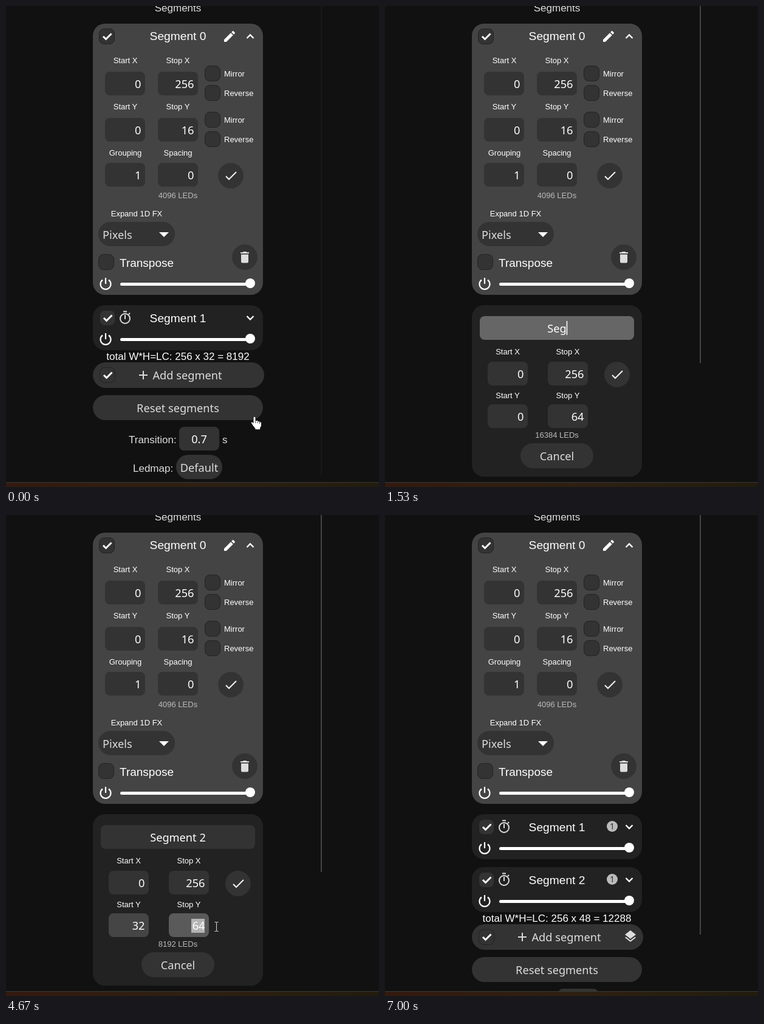
An HTML page that plays this animation: 614 px wide and 791 px high, repeating every 7400 ms.

```html
<!DOCTYPE html>
<html lang="en">
<head>
<meta charset="utf-8">
<title>Adding a segment</title>
<style>
html, body { margin: 0; width: 100%; height: 100%; overflow: hidden; background: #111; }
svg { display: block; width: 614px; height: 791px; }
text { font-family: "Liberation Sans", Arial, sans-serif; fill: #fff; white-space: pre; }
.ui { font-family: "Noto Sans", Tahoma, sans-serif; }
.line { fill: none; stroke: #fff; }
</style>
</head>
<body>
<svg id="stage" viewBox="0 0 614 791"></svg>
<script>
const LOOP = 7400, FORM_AT = 470, LIST_AT = 6130;
const stage = document.getElementById('stage');

// Markup helpers
const box = (x, y, w, h, r, fill, more = '') =>
  `<rect x="${x}" y="${y}" width="${w}" height="${h}" rx="${r}" fill="${fill}" ${more}/>`;
const disc = (x, y, r, fill, more = '') => `<circle cx="${x}" cy="${y}" r="${r}" fill="${fill}" ${more}/>`;
const line = (d, w = 2, color = '#fff') => `<path class="line" d="${d}" style="stroke:${color}" stroke-width="${w}"/>`;
const text = (s, x, y, size, anchor = 'middle', more = '') =>
  `<text x="${x}" y="${y}" font-size="${size}" text-anchor="${anchor}" ${more}>${s}</text>`;
const ui = (s, x, y, anchor = 'middle', color = '#fff', more = '') =>
  text(s, x, y, 18.2, anchor, `class="ui" style="fill:${color}" ${more}`);
const label = (s, x, y, anchor) => text(s, x, y, 13, anchor);
const group = (id, body, dy = 0) => `<g id="${id}" transform="translate(0 ${dy})">${body}</g>`;

const field = (s, x, y, id) =>
  box(x, y, 66, 39, 8, '#333', id ? `id="${id}Box"` : '') +
  (id ? box(x + 37, y + 9, 22, 23, 0, '#b4b4b4', `id="${id}Sel"`) : '') +
  ui(s, x + 59.5, y + 27, 'end', '#fff', id ? `id="${id}"` : '');
const tick = (x, y, on) => box(x - 12.5, y - 12.5, 25, 25, 8, '#333', 'stroke="#222"') +
  (on ? line(`M${x - 6} ${y}l4.5 4.5 9-9`, 3) : '');
const confirm = (x, y, id = 'apply') => disc(x, y, 21, '#333', `id="${id}"`) +
  line(`M${x - 8} ${y + 1}l5 5 12-12`, 2.1, '#eee');
const slider = y =>
  line(`M159 ${y - 6.5}a8.5 8.5 0 1 0 10 0M164 ${y - 10}v10`, 2.2) +
  box(188, y - 2, 218, 5, 2.5, '#fff') + disc(402, y - 1, 8, '#fff');

const openCard = () =>
  box(143, 29, 280, 446, 20, '#444') + tick(166, 50, true) +
  text('Segment 0', 283, 56, 19.2) +
  `<path fill="#fff" transform="translate(356 38)" d="M3 17.25V21h3.75L17.81 9.94l-3.75-3.75zM20.71 7.04a1 1 0 0 0 0-1.41l-2.34-2.34a1 1 0 0 0-1.41 0l-1.83 1.83 3.75 3.75z"/>` +
  line('M396.5 53l5.5-5.5 5.5 5.5', 2.3) +
  [['Start X', 'Stop X', 0, 256, 94, 108], ['Start Y', 'Stop Y', 0, 16, 170, 184],
   ['Grouping', 'Spacing', 1, 0, 246, 258]].map(([a, b, m, n, y, fy]) =>
    label(a, 196.5, y) + label(b, 283, y) + field(m, 163, fy) + field(n, 250, fy)).join('') +
  [111, 187].map(y => tick(340, y) + label('Mirror', 359, y + 5, 'start') +
    tick(340, y + 32) + label('Reverse', 359, y + 37, 'start')).join('') +
  confirm(370, 279) +
  text('4096 LEDs', 283, 316, 13, 'middle', 'style="fill:#bbb"') +
  label('Expand 1D FX', 215, 346) +
  box(152, 355, 126, 40, 20, '#333') + ui('Pixels', 159, 383, 'start', '#ddd') +
  '<path fill="#fff" d="M252 372h16l-8 8z"/>' +
  tick(165, 421) + text('Transpose', 187, 429, 19, 'start') +
  disc(393, 413, 21, '#333') +
  '<path fill="#ddd" d="M386 405h3.5l1-1h5l1 1h3.500v2h-14zM387 408.500h12v12q0 2-2 2h-8q-2 0-2-2z"/>' +
  slider(457);

const card = (n, y, badge) =>
  box(143, y, 280, 74, 20, '#222') + tick(167, y + 21, true) +
  line(`M193 ${y + 10.500}h6M196 ${y + 16}v7M202 ${y + 15}l2-2`, 2, '#ddd') +
  disc(196, y + 22, 8, 'none', 'stroke="#ddd" stroke-width="2"') +
  text('Segment ' + n, 283, y + 28, 19.2) +
  (badge ? disc(374, y + 20, 9, '#bbb') +
    text('1', 374, y + 25, 14, 'middle', 'class="ui" style="fill:#333"') : '') +
  line(`M396.500 ${y + 18}l5.500 5.500 5.500-5.500`, 2.3) + slider(y + 56);

const footer = (total, id, layers) =>
  text(`total W*H=LC: ${total}`, 283, 582, 17) +
  box(143, 586, 282, 42, 21, '#333', `id="${id}"`) + tick(167, 607, true) +
  line('M219 607h14M226 600v14', 2, '#ddd') + ui('Add segment', 241.500, 614, 'start', '#ddd') +
  (layers ? '<path fill="#ddd" transform="translate(392 594)" d="M11.99 18.54l-7.37-5.73L3 14.07l9 7 9-7-1.63-1.27zM12 16l7.36-5.73L21 9l-9-7-9 7 1.63 1.27z"/>' : '') +
  box(143, 640, 280, 41, 20.500, '#333') + ui('Reset segments', 283, 668, 'middle', '#ddd') +
  text('Transition:', 202, 719, 17, 'start', 'style="fill:#ddd"') + box(285, 692, 66, 39, 8, '#333') +
  ui('0.7', 318, 719) + text('s', 356, 719, 17, 'start', 'style="fill:#ddd"') +
  text('Ledmap:', 209, 766, 17, 'start', 'style="fill:#ddd"') + box(280, 738, 76, 40, 20, '#333') +
  ui('Default', 318, 766, 'middle', '#ddd');

const form = () =>
  box(143, 492, 280, 282, 20, '#222') + box(156, 510, 254, 39, 8, '#333', 'id="nameBox"') +
  ui('', 283, 537, 'middle', '#fff', 'id="name"') + box(0, 518, 1.500, 23, 0, '#fff', 'id="caret"') +
  label('Start X', 202, 573) + label('Stop X', 301, 573) + field(0, 169, 585) + field(256, 268, 585) +
  label('Start Y', 202, 645) + label('Stop Y', 301, 645) +
  field(0, 169, 655, 'from') + field(64, 268, 655, 'to') +
  confirm(382, 606, 'create') +
  text('', 283, 710, 13, 'middle', 'id="leds" style="fill:#bbb"') +
  box(223, 719, 120, 41, 20.500, '#333') + ui('Cancel', 283, 747, 'middle', '#ddd');

stage.innerHTML =
  '<linearGradient id="edge"><stop stop-color="#33190f"/><stop offset=".5" stop-color="#2e2012"/><stop offset="1" stop-color="#221c0e"/></linearGradient>' +
  box(0, 0, 614, 791, 0, '#111') +
  text('Segments', 283, 9, 17, 'middle', 'style="fill:#ddd"') +
  box(518, 0, 2, 587, 0, '#444', 'id="bar"') + openCard() +
  group('before', card(1, 492) + footer('256 x 32 = 8192', 'addA')) +
  group('form', form()) +
  group('after', card(1, 492, true) + card(2, 579, true) +
    group('rest', footer('256 x 48 = 12288', 'addB', true), 87)) +
  box(0, 783, 614, 8, 0, 'url(#edge)') + box(0, 783, 614, 1, 0, '#3b3835') +
  '<g id="hand"><path fill="#fff" stroke="#111" d="M-2 2a2 2 0 0 1 4 0v5l1-.6 2 .2 1 1 2 .2 1 1 1.500 .2 1 1.300v5l-2 4v2.500H1v-2l-4-5-2.500-4c-.5-1.500 1.500-2.500 3-1l.5.8z"/>' +
  '<path class="line" style="stroke:#111" stroke-width=".8" d="M2 7v4M5.500 8v3M8.500 9v3"/></g>' +
  '<path id="arrow" fill="#fff" stroke="#111" d="M0 0v16l3.700-3.500 2.300 5.500 2.500-1-2.300-5.300h5z"/>' +
  '<path id="beam" class="line" style="mix-blend-mode:difference" d="M-3-7.500h2.500l.5.500.5-.5H3M0-7V7M-3 7.500h2.500L0 7l.5.500H3"/>';

const el = {};
stage.querySelectorAll('[id]').forEach(e => el[e.id] = e);

// Pointer path: time, x, y, shape until the next entry
const path = [
  [0, 409, 675, 'hand'], [70, 409, 675, 'hand'], [400, 348, 603, 'hand'], [500, 348, 603, 'hand'],
  [730, 341, 562, 'hand'], [770, 339, 552, 'beam'], [850, 338, 544, 'beam'], [1070, 338, 544, ''],
  [2730, 336.500, 540, 'beam'], [2800, 326, 553, 'arrow'], [3130, 182, 717, 'arrow'], [3270, 182, 717, 'arrow'],
  [3440, 224, 690, 'beam'], [3530, 226, 676, 'beam'], [3640, 206, 676, 'beam'], [4130, 206, 676, ''],
  [4350, 214, 676, 'beam'], [4560, 303, 677, 'beam'], [4670, 346.500, 677, 'beam'], [4870, 357, 682, 'beam'],
  [5400, 357, 682, ''], [5570, 357, 682, 'arrow'], [5860, 376, 620, 'hand'], [6000, 378, 606, 'hand'],
  [6200, 378, 606, 'hand'], [6800, 382, 795, '']
];
// Holding still where the picture rests
const rests = [[850, 1070], [3640, 4130], [4870, 5400]];
const strokes = [1070, 1330, 1530, 1730, 1870, 1930, 2000, 2070, 2330];

const ramp = (t, a) => Math.max(0, Math.min(1, (t - a) / 200));
const pulse = (t, on, off) => ramp(t, on) - ramp(t, off);
const gray = (e, k, top = 102) => {
  const v = Math.round(51 + (top - 51) * k);
  e.setAttribute('fill', `rgb(${v},${v},${v})`);
};
const show = (e, on) => e.style.display = on ? '' : 'none';

function pointer(t) {
  let i = path.length - 1;
  while (path[i][0] > t) i--;
  const [t0, x0, y0, kind] = path[i];
  const [t1, x1, y1] = path[i + 1] || [LOOP, x0, y0];
  const still = rests.some(([a, b]) => t >= a && t < b);
  const k = still ? 0 : (t - t0) / (t1 - t0);
  for (const id of ['hand', 'arrow', 'beam']) show(el[id], id === kind);
  if (kind) el[kind].setAttribute('transform', `translate(${x0 + (x1 - x0) * k} ${y0 + (y1 - y0) * k})`);
}

function draw(t) {
  const early = t < FORM_AT, late = t >= LIST_AT;
  show(el.before, early);
  show(el.form, !early && !late);
  show(el.after, late);
  el.bar.setAttribute('height', early ? 771 : late ? 690 : 587);
  el.bar.setAttribute('fill', early ? '#181818' : '#444');
  gray(el.addA, pulse(t, 330, 900), 76);
  gray(el.addB, pulse(t, 6270, 6480), 76);

  const typed = 'Segment 2'.slice(0, strokes.filter(s => s <= t).length);
  el.name.textContent = typed || 'New segment 2';
  el.name.style.fill = typed ? '#fff' : '#999';
  gray(el.nameBox, pulse(t, 870, 3500));
  show(el.caret, t >= 940 && t < 3500);
  if (!early && !late) el.caret.setAttribute('x', 283 + (typed ? el.name.getComputedTextLength() / 2 : 0));

  const from = t < 4130 ? 0 : t < 4270 ? 3 : 32;
  const to = t < 5400 ? 64 : t < 5530 ? 4 : 48;
  el.from.textContent = from;
  el.to.textContent = to;
  el.leds.textContent = Math.max(0, to - from) * 256 + ' LEDs';
  gray(el.fromBox, pulse(t, 3500, 4540));
  gray(el.toBox, pulse(t, 4520, 5960));
  show(el.fromSel, t >= 3600 && t < 4130);
  el.fromSel.setAttribute('x', 217.500);
  el.fromSel.setAttribute('width', 10.500);
  show(el.toSel, t >= 4620 && t < 5400);
  gray(el.create, ramp(t, 5800), 85);
  pointer(t);
}

const start = performance.now();
(function tick() {
  draw((performance.now() - start) % LOOP);
  requestAnimationFrame(tick);
})();
</script>
</body>
</html>
```
